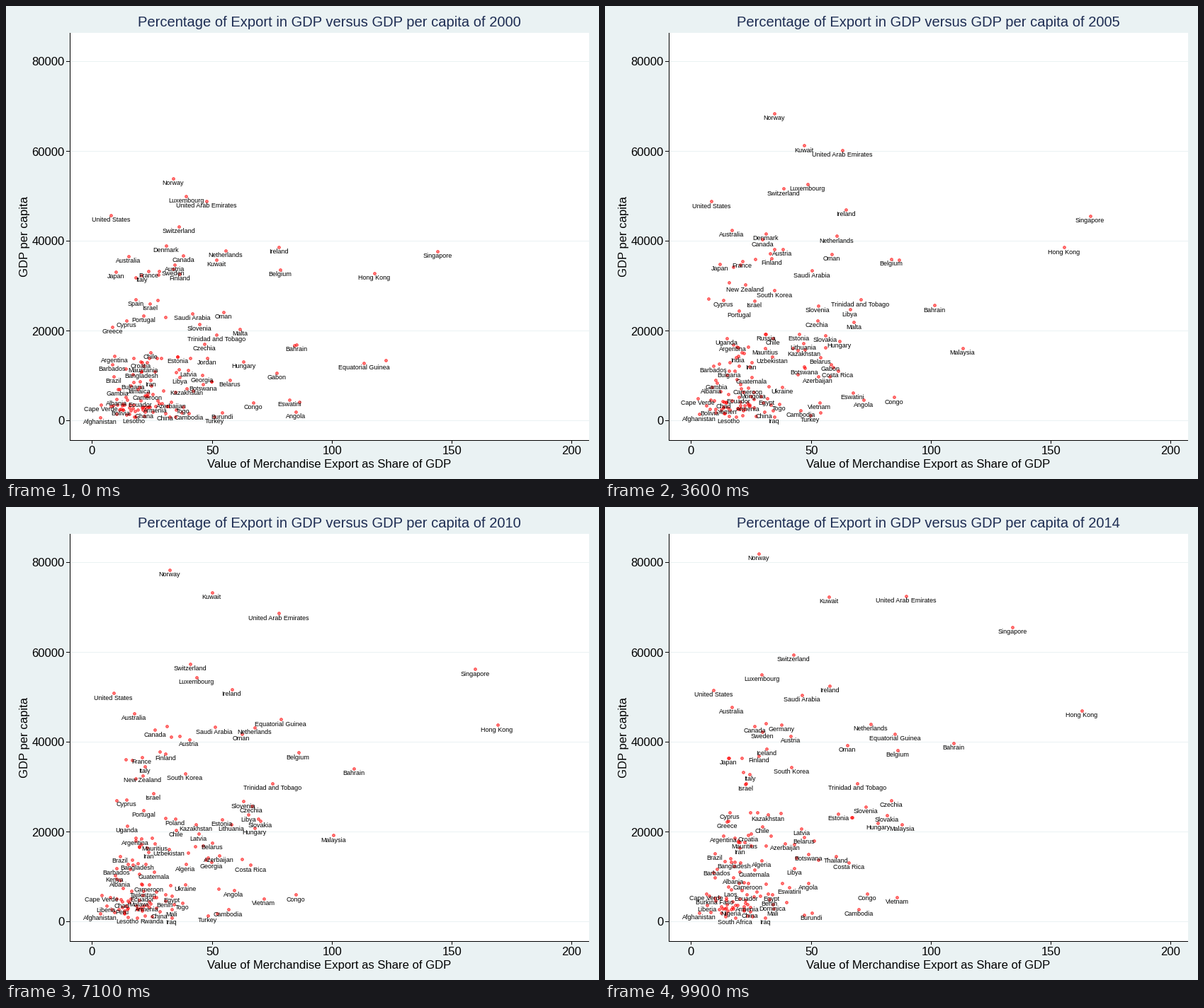
A matplotlib script that plays this animation: 837 by 669 pixels, repeating every 10000 ms.

```python
import numpy as np
import matplotlib.pyplot as plt
from matplotlib.animation import FuncAnimation
from matplotlib.patches import Rectangle

W, H, DPI = 837, 669, 64
PX = 72 / DPI  # points per pixel
FRAMES, INTERVAL = 100, 100
X0, X_UNIT = 121.8, 3.385
Y0, Y_UNIT = 586.2, 0.006345
LABEL_DROP, LABEL_HEIGHT = 9.3, 6
PAPER, NAVY = "#eaf2f3", "#1e2d53"

plt.rcParams["font.family"] = "Liberation Sans"
countries = []


def track(name, start, end, bend=(0, 0)):
    """Move from start to end on the stage, pushed off course by bend midway."""
    countries.append((name, start, end, bend))


# High incomes
track("Australia", (173, 353), (179, 282), (4, 0))
track("Austria", (238, 365), (262, 323), (4, 0))
track("Bahrain", (410, 478), (492, 333), (27, 21))
track("Belgium", (387, 372), (413, 343), (8, 0))
track("Canada", (250, 352), (211, 309), (-15, 0))
track("Denmark", (226, 338), (227, 305))
track("Equatorial Guinea", (505, 504), (409, 320), (-60, -55))
track("Finland", (245, 378), (217, 351), (0, -8))
track("France", (201, 374), (193, 354), (-5, -4))
track("Germany", (215, 379), (249, 307), (6, 8))
track("Hong Kong", (520, 377), (673, 287), (78, 11))
track("Iceland", (216, 374), (228, 341), (-10, 0))
track("Ireland", (385, 340), (317, 252), (-22, -8))
track("Italy", (191, 380), (204, 377), (-6, -14))
track("Japan", (155, 375), (174, 354))
track("Kuwait", (297, 358), (316, 126), (-25, -45))
track("Luxembourg", (254, 268), (221, 236), (47, 0))
track("Netherlands", (310, 345), (375, 306), (-8, 0))
track("Norway", (236, 243), (217, 65), (10, 0))
track("Oman", (307, 432), (342, 336), (0, -35))
track("Saudi Arabia", (263, 434), (278, 265), (25, 29))
track("Singapore", (609, 346), (575, 169), (95, 45))
track("Sweden", (236, 371), (222, 317), (8, 0))
track("Switzerland", (244, 311), (266, 208))
track("United Arab Emirates", (283, 275), (425, 125), (0, 6))
track("United Kingdom", (183, 383), (175, 354))
track("United States", (148, 295), (153, 258))

# Middle incomes
track("Argentina", (153, 494), (167, 464), (24, 0))
track("Azerbaijan", (233, 559), (254, 475), (65, 8))
track("Barbados", (150, 506), (158, 511))
track("Belarus", (316, 528), (281, 466))
track("Brazil", (152, 523), (155, 489), (8, 0))
track("Chile", (204, 489), (222, 451), (28, 0))
track("Costa Rica", (290, 530), (344, 502), (20, 0))
track("Croatia", (190, 502), (202, 463), (-10, 0))
track("Cyprus", (170, 444), (176, 431), (-6, -24))
track("Czechia", (280, 477), (404, 414), (-28, 0))
track("Estonia", (242, 495), (329, 433))
track("Greece", (150, 453), (172, 444), (-13, -38))
track("Hungary", (335, 502), (385, 446), (-25, 0))
track("Iran", (204, 528), (190, 481), (8, 0))
track("Israel", (203, 420), (198, 391), (10, 12))
track("Kazakhstan", (255, 540), (230, 434), (38, 0))
track("Latvia", (257, 514), (277, 454))
track("Libya", (245, 524), (267, 510), (100, -95))
track("Lithuania", (240, 517), (348, 438))
track("Malaysia", (536, 500), (419, 448), (12, 11))
track("Malta", (330, 456), (349, 438), (15, 0))
track("Mauritius", (242, 495), (197, 473))
track("New Zealand", (214, 415), (195, 374), (-10, 0))
track("Poland", (213, 497), (248, 432))
track("Portugal", (194, 437), (205, 431), (-10, -4))
track("Russia", (219, 497), (215, 431), (10, 0))
track("Seychelles", (407, 479), (295, 471), (-60, 8))
track("Slovakia", (260, 497), (398, 435))
track("Slovenia", (273, 449), (368, 423), (-8, -13))
track("South Korea", (225, 439), (263, 367))
track("Spain", (183, 414), (199, 390), (-15, -12))
track("Thailand", (290, 530), (326, 493), (20, 0))
track("Trinidad and Tobago", (297, 464), (356, 390), (45, -12))

# Low incomes far from the crowd
track("Afghanistan", (133, 581), (133, 573))
track("Albania", (156, 555), (181, 523), (-16, 0))
track("Algeria", (264, 543), (221, 499), (25, 0))
track("Angola", (409, 573), (287, 531), (0, 6))
track("Botswana", (278, 534), (287, 490))
track("Cambodia", (258, 575), (358, 568), (-20, 0))
track("Cape Verde", (134, 563), (143, 546), (-7, 0))
track("Congo", (349, 560), (370, 546), (55, 0))
track("Eswatini", (400, 556), (260, 537))
track("Gabon", (382, 518), (270, 495), (-25, 0))
track("Turkmenistan", (414, 559), (234, 464), (-35, 15))
track("Vietnam", (240, 570), (412, 551))

CROWD = """Armenia, Bangladesh, Benin, Bolivia, Bosnia and Herzegovina,
Bulgaria, Burkina Faso, Burundi, Cameroon, Chad, China, Colombia, Djibouti,
Dominica, Ecuador, Egypt, El Salvador, Ethiopia, Gambia, Georgia, Ghana,
Guatemala, Guinea, Haiti, Honduras, India, Indonesia, Iraq, Jamaica, Jordan,
Kenya, Kyrgyzstan, Laos, Lebanon, Lesotho, Liberia, Madagascar, Malawi, Mali,
Mauritania, Mexico, Moldova, Mongolia, Morocco, Mozambique, Namibia, Nepal,
Nicaragua, Niger, Nigeria, Pakistan, Panama, Paraguay, Peru, Philippines,
Romania, Rwanda, Senegal, Serbia, Sierra Leone, South Africa, Sri Lanka,
Sudan, Syria, Tajikistan, Tanzania, Togo, Tunisia, Turkey, Uganda, Ukraine,
Uruguay, Uzbekistan, World, Yemen, Zambia, Zimbabwe"""


def stage(share, gdp):
    return X0 + X_UNIT * share, Y0 - Y_UNIT * gdp


def scatter_crowd(seed=7):
    rng = np.random.default_rng(seed)
    for name in CROWD.replace("\n", " ").split(", "):
        gdp = np.clip(rng.lognormal(8.1, 0.9), 900, 14000)
        share = 3 + rng.gamma(3.2, 6.5) + gdp / 3000
        grown = gdp * rng.uniform(1, 1.7)
        moved = share * rng.uniform(0.75, 1.2)
        track(name, stage(share, gdp), stage(moved, grown), rng.normal(0, 6, 2) * (1, 0))


scatter_crowd()
names = [c[0] for c in countries]
start, end, bend = (np.array([c[i] for c in countries], float) for i in (1, 2, 3))


def positions(t):
    """Share moves evenly; income rises fast, then levels off."""
    ease = np.array([t, 1 - (1 - t) ** 1.6])
    return start + (end - start) * ease + bend * 4 * t * (1 - t)


fig = plt.figure(figsize=(W / DPI, H / DPI), dpi=DPI, facecolor=PAPER)
ax = fig.add_axes([0, 0, 1, 1])
ax.set_xlim(0, W)
ax.set_ylim(H, 0)
ax.axis("off")


def write(x, y, s, size, color="black", **kw):
    kw = {"ha": "center", "va": "baseline", **kw}
    return ax.text(x, y, s, fontsize=size * PX, color=color, **kw)


def line(xs, ys, color="black", z=2):
    ax.plot(xs, ys, color=color, lw=PX, zorder=z, snap=False,
            solid_capstyle="butt")


ax.add_patch(Rectangle((90, 38), 733, 576, color="white", lw=0, zorder=0))
for value in range(0, 80001, 20000):
    y = np.floor(stage(0, value)[1]) + 0.5
    line([90, 823], [y, y], PAPER, 1)
    line([85, 90], [y, y])
    write(82.5, y + 6, str(value), 16.6, ha="right")
for value in range(0, 201, 50):
    x = np.floor(stage(value, 0)[0]) + 0.5
    line([x, x], [614, 619])
    write(x, 633.5, str(value), 16.6)
line([90.5, 90.5], [38, 615])
line([90, 823], [614.5, 614.5])
write(456.5, 652.5, "Value of Merchandise Export as Share of GDP", 16.6)
write(31, 326, "GDP per capita", 16.6, rotation=90, rotation_mode="anchor")
title = write(456.5, 29.3, "", 20.15, NAVY)

dots = ax.scatter([], [], s=(3.6 * PX) ** 2, facecolor=(1, 0, 0, 0.45),
                  edgecolor=(1, 0, 0, 0.7), linewidth=PX, zorder=3)
labels = [write(0, 0, name, 9, zorder=4) for name in names]
widths = [label.get_window_extent().width for label in labels]


def is_free(x, y, w, placed):
    return all(abs(x - px) >= (w + pw) / 2 - 3 or abs(y - py) >= LABEL_HEIGHT
               for px, py, pw in placed)


def update(frame):
    t = frame / (FRAMES - 1)
    now = positions(t)
    dots.set_offsets(now + 0.5)
    placed = []
    for label, (x, y), w in zip(labels, now, widths):
        free = is_free(x, y, w, placed)
        label.set_visible(free)
        if free:
            label.set_position((x, y + 0.5 + LABEL_DROP))
            placed.append((x, y, w))
    year = 2000 + round(14 * t)
    title.set_text(f"Percentage of Export in GDP versus GDP per capita of {year}")
    return [dots, title, *labels]


anim = FuncAnimation(fig, update, frames=FRAMES, interval=INTERVAL,
                     repeat=True, repeat_delay=0, blit=False)
plt.show()
```
